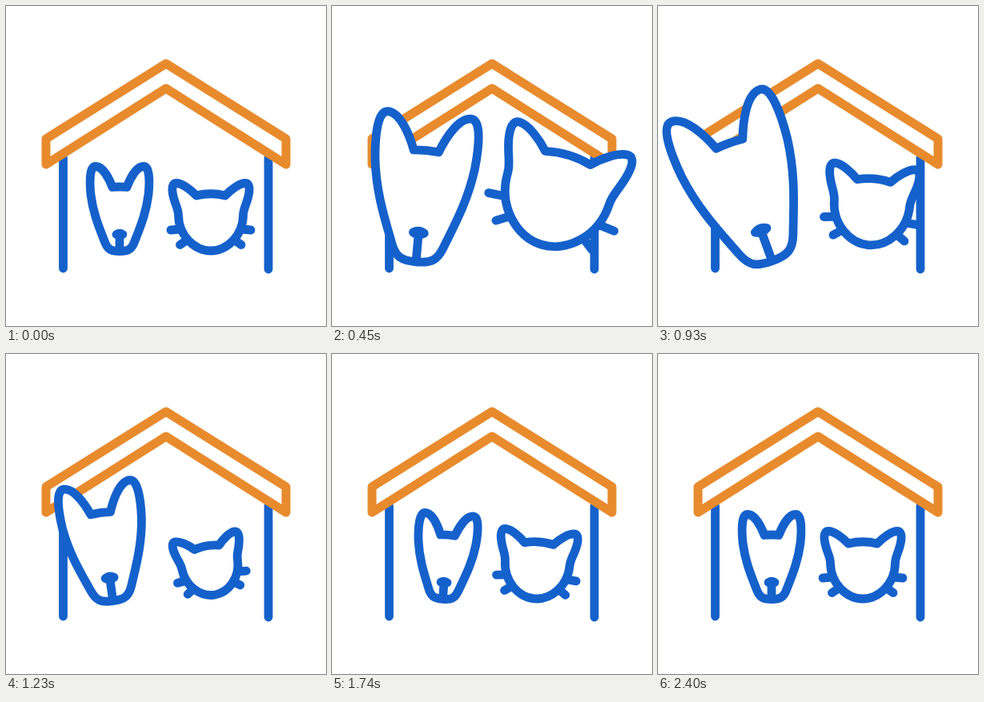
These frames come from a looping animation (400x400 px, 2.43 s). An HTML page:

```html
<!DOCTYPE html>
<html lang="en">
<head>
<meta charset="utf-8">
<title>Pet shelter</title>
<style>
  html, body { margin: 0; width: 100%; height: 100%; overflow: hidden; background: #fff; }
  svg { display: block; width: 100%; height: 100%; }
  path {
    fill: none; stroke: #1561cb; stroke-width: 10.8;
    stroke-linecap: round; stroke-linejoin: round;
    vector-effect: non-scaling-stroke;
  }
  .roof { stroke: #e88b2d; stroke-width: 11; }
  .head { fill: #fff; }
  .nose { fill: #1561cb; }

  .dog, .cat {
    animation-duration: 2430ms;
    animation-iteration-count: infinite;
    animation-timing-function: cubic-bezier(.3333, 0, .6667, 1);
  }
  .dog { animation-name: dog-move, dog-turn, dog-size; }
  .cat { animation-name: cat-move, cat-turn, cat-size; }

  @keyframes dog-move {
    0%, 64.2%, 100% { translate: 142px 260.5px; }
    19.75%          { translate: 112px 240px; }
    28.4%, 39.51%   { translate: 112px 234.5px; }
  }
  @keyframes dog-turn {
    0%, 80.25%, 100% { rotate: 0deg; }
    12.35%           { rotate: 10deg; }
    37.04%, 39.51%   { rotate: -20deg; }
    64.2%            { rotate: 8deg; }
  }
  @keyframes dog-size {
    0%, 59.26%, 100% { scale: 1; }
    26.75%, 39.51%   { scale: 1.95; }
  }

  @keyframes cat-move {
    0%, 51.85%, 100% { translate: 256px 271.5px; }
    22.22%           { translate: 280px 242px; }
  }
  @keyframes cat-turn {
    0%, 81.48%, 100% { rotate: 0deg; }
    24.69%, 25.93%   { rotate: 20deg; }
    50.62%           { rotate: -10deg; }
    66.67%           { rotate: 6deg; }
  }
  @keyframes cat-size {
    0%, 66.67%, 100% { scale: 1; }
    22.22%           { scale: 1.69; }
    49.38%           { scale: .87; }
  }
</style>
</head>
<body>
<svg viewBox="0 0 400 400">
  <path d="M71.5 190V328M328 190V329"/>
  <path class="roof" d="M200 72L350 166V198L200 103L50 198V166Z"/>

  <g class="dog">
    <path class="head" d="M-9-34Q0-35 9-34C13-44.5 21-60 30-60C38-60 37.5-39.5 36-24.5
      C33-.5 25 17.5 18.5 34.5C15 43.5 11 46 0 46S-15 43.5-18.5 34.5
      C-25 17.5-33-.5-36-24.5C-37.5-39.5-38-60-30-60C-21-60-13-44.5-9-34Z"/>
    <path class="nose" d="M-4 25Q0 22.5 4 25Q0 27.5-4 25ZM0 25V44.5"/>
  </g>

  <g class="cat">
    <path d="M-50 8.5L-39 7.5M-38.5 27L-31 22M50 8.5L39 7.5M38 27L31 22"/>
    <path class="head" d="M-18-34.5Q0-39 18-34.5C25-42 36-50 43-50C51-50 48-36 45-27
      C43-21 40.5-16 40.5-10C40 16 20 34.5 0 34.5S-40 16-40.5-10
      C-40.5-16-43-21-45-27C-48-36-51-50-43-50C-36-50-25-42-18-34.5Z"/>
  </g>
</svg>
</body>
</html>
```
